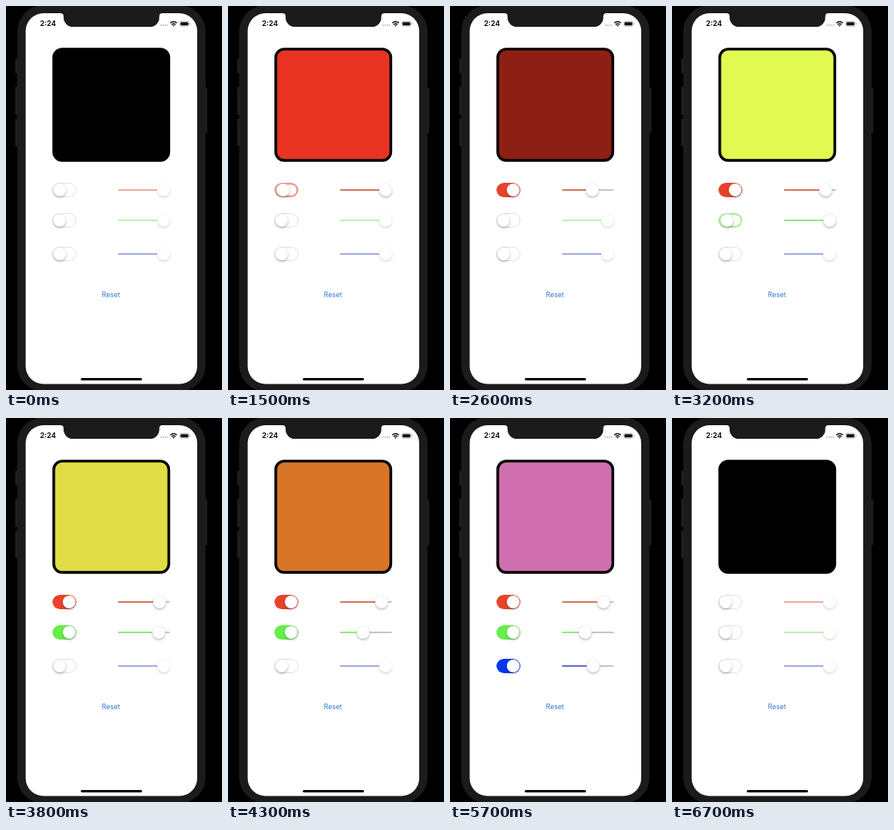
Write an HTML page that moves like this. It is 270x480 px and loops after 7100 ms.

```html
<!DOCTYPE html>
<html lang="en">
<head>
<meta charset="utf-8">
<title>Colour mixer</title>
<style>
  html, body { margin: 0; width: 100%; height: 100%; overflow: hidden; background: #000; }
  #stage { position: relative; width: 270px; height: 480px; overflow: hidden; font-family: Inter, Roboto, sans-serif; }
  #stage > svg { position: absolute; left: 0; top: 0; }
  .row { position: absolute; left: 0; width: 270px; height: 0; --on: 0; --v: 1; --live: 0; }
  .switch {
    position: absolute; left: 58px; top: -9px; width: 30px; height: 18px; border-radius: 9px;
    background: #fff; overflow: hidden;
    box-shadow: inset 0 0 0 1px #e1e1e1;
  }
  .fill {
    position: absolute; inset: 0; border-radius: 9px;
    opacity: min(1, calc(var(--on) * 3));
    box-shadow: inset 0 0 0 calc(1px + var(--on) * 8.5px) var(--tint);
  }
  .knob {
    position: absolute; width: 16px; height: 16px; top: -8px; border-radius: 50%;
    background: #fff; box-shadow: 0 1.5px 3px rgba(0, 0, 0, .27), 0 0 .5px rgba(0, 0, 0, .2);
  }
  .switch + .knob { left: calc(59px + var(--on) * 12px); }
  .slider { position: absolute; left: 140px; top: 0; width: 65px; opacity: calc(.58 + var(--live) * .42); }
  .slider i { position: absolute; left: 0; top: -1px; height: 2px; border-radius: 1px; }
  .rest { width: 65px; background: #c6c6c6; }
  .done { width: calc(8px + var(--v) * 49px); background: var(--line); }
  .slider .knob { left: calc(var(--v) * 49px); }
</style>
</head>
<body>
<div id="stage">
  <svg width="270" height="480" viewBox="0 0 270 480">
    <g fill="#202020">
      <rect x="11.5" y="66" width="4" height="18" rx="1"/>
      <rect x="11.5" y="101" width="4" height="35" rx="1"/>
      <rect x="11.5" y="141" width="4" height="34" rx="1"/>
      <rect x="247" y="102" width="4.5" height="57" rx="1"/>
    </g>
    <rect x="14" y="-1" width="235.5" height="483" rx="33" fill="#1b1b1b"/>
    <rect x="24.6" y="9" width="214.4" height="463.5" rx="22.3" fill="#fff"/>
    <path d="M68 8.5H195.6V9Q191.6 9 191.6 13V14.5A11.5 11.5 0 0 1 180.1 26H83.5A11.5 11.5 0 0 1 72 14.5V13Q72 9 68 9Z" fill="#1b1b1b"/>
    <text x="42.5" y="25.2" font-size="8.8" font-weight="700" fill="#111">2:24</text>
    <g fill="#bbb">
      <circle cx="194" cy="24" r=".9"/><circle cx="196.7" cy="24" r=".9"/>
      <circle cx="199.4" cy="24" r=".9"/><circle cx="202" cy="24" r=".9"/>
    </g>
    <path d="M205.3 21.3Q209.5 17.6 213.7 21.3M207 23.2Q209.5 21.1 212 23.2" fill="none" stroke="#111" stroke-width="1.4"/>
    <path d="M208.1 24.3Q209.5 23.3 210.9 24.3L209.5 25.8Z" fill="#111"/>
    <rect x="217.2" y="19.2" width="11.6" height="6" rx="1.8" fill="none" stroke="#999" stroke-width=".7"/>
    <rect x="218.2" y="20.2" width="9.6" height="4" rx="1" fill="#111"/>
    <rect x="229.6" y="21.2" width=".9" height="2" rx=".4" fill="#999"/>
    <rect x="93.5" y="465" width="76.5" height="3" rx="1.5" fill="#000"/>
    <rect id="swatch" x="59.7" y="53.9" width="143.8" height="139.1" rx="10.5" stroke="#000" stroke-width="3.4"/>
    <text id="reset" x="131.2" y="364" font-size="8.6" text-anchor="middle" fill="#2f76d2">Reset</text>
  </svg>
</div>
<script>
  const LOOP = 7100, STEP = 100, RESET = 6100;

  // start: switch flips on; drag: [time, slider value]
  const channels = [
    { y: 230, tint: '#e8432a', line: '#d4785c', start: 1500,
      drag: [[2200, 1], [2600, .61], [2800, .9]] },
    { y: 268, tint: '#65ef48', line: '#92e884', start: 3200,
      drag: [[3700, 1], [3800, .88], [4000, .58], [4100, .58], [4300, .43]] },
    { y: 310, tint: '#0736ee', line: '#6670c8', start: 4800,
      drag: [[5100, 1], [5300, .87], [5500, .7], [5600, .7], [5900, .5]] }
  ];

  const stage = document.getElementById('stage');
  const swatch = document.getElementById('swatch');
  const reset = document.getElementById('reset');

  for (const c of channels) {
    c.row = document.createElement('div');
    c.row.className = 'row';
    c.row.style.cssText = `top:${c.y}px;--tint:${c.tint};--line:${c.line}`;
    c.row.innerHTML = '<div class="switch"><div class="fill"></div></div><div class="knob"></div>' +
      '<div class="slider"><i class="rest"></i><i class="done"></i><div class="knob"></div></div>';
    stage.append(c.row);
    c.flip = [[c.start - 100, 0], [c.start, .17], [c.start + 100, .6], [c.start + 200, .9],
      [c.start + 300, 1], [RESET - 100, 1], [RESET, .85], [RESET + 100, .4], [RESET + 300, 0]];
  }

  function at(keys, t) {
    const i = keys.findIndex(k => k[0] > t);
    if (i === 0) return keys[0][1];
    if (i < 0) return keys[keys.length - 1][1];
    const [t0, a] = keys[i - 1], [t1, b] = keys[i];
    return a + (b - a) * (t - t0) / (t1 - t0);
  }

  function draw(now) {
    const t = Math.floor((now % LOOP) / STEP) * STEP;
    const [r, g, b] = channels.map(c => {
      const live = t >= c.start && t < RESET;
      const v = t < RESET ? at(c.drag, t) : 1;
      c.row.style.setProperty('--on', at(c.flip, t));
      c.row.style.setProperty('--v', v);
      c.row.style.setProperty('--live', +live);
      return live ? v : 0;
    });
    // Wide-gamut primaries as they look on an ordinary screen
    const red = 232 * r + 16 * g - 12 * b;
    const green = 51 * r + 204 * g ** 1.25 - 10 * b;
    const blue = 35 * r + 50 * g * g + 212 * b;
    swatch.style.fill = `rgb(${[red, green, blue].map(Math.round)})`;
    reset.style.opacity = at([[RESET - 100, 1], [RESET, .4], [RESET + 300, 1]], t);
    requestAnimationFrame(draw);
  }
  requestAnimationFrame(draw);
</script>
</body>
</html>
```
